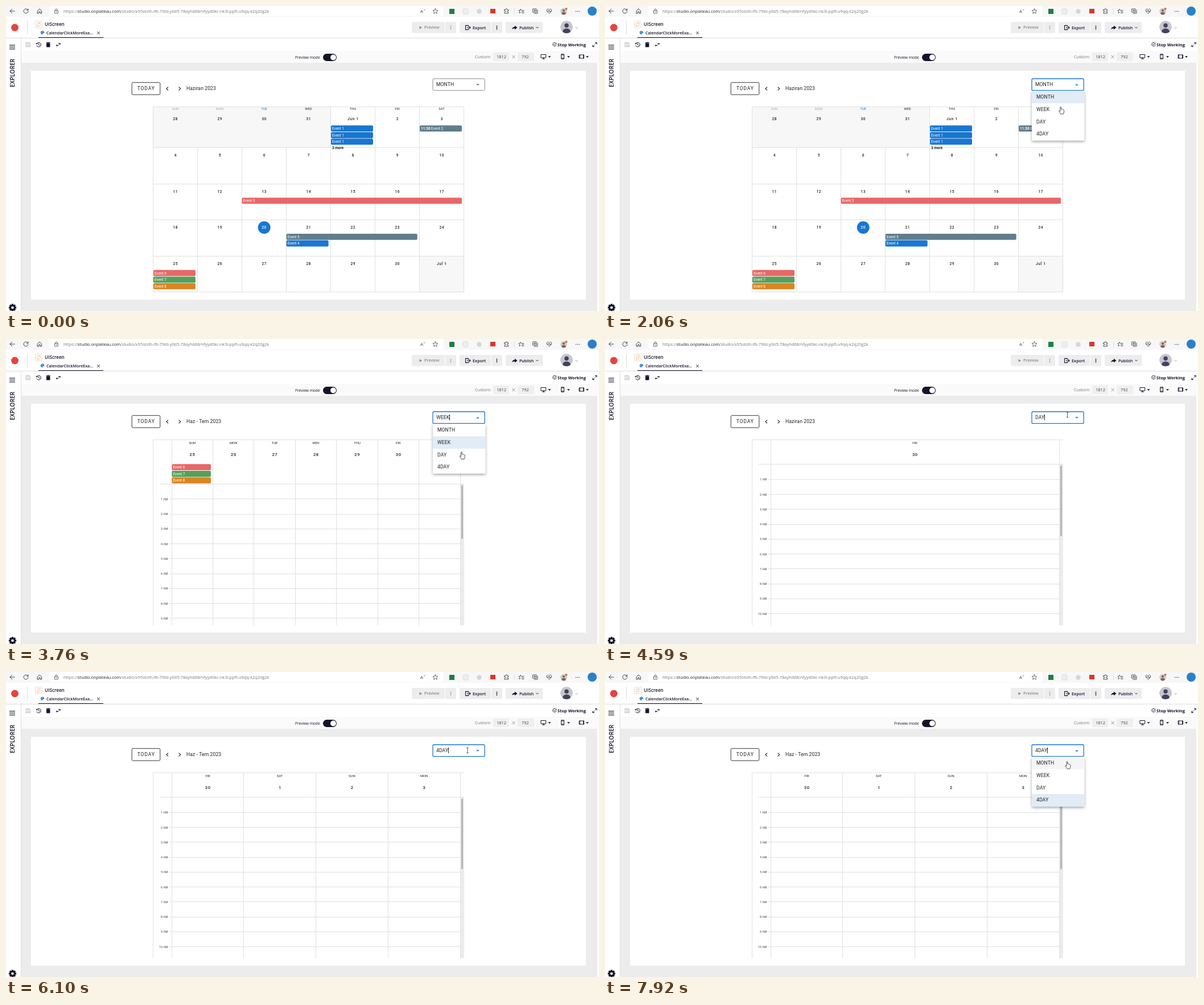
Write an HTML page with a canvas that moves like this. It is 1042x537 px and loops after 8 s.

```html
<!DOCTYPE html>
<html lang="en">
<head>
<meta charset="utf-8">
<title>Calendar view switcher</title>
<style>
html, body { margin: 0; width: 100%; height: 100%; overflow: hidden; background: #fff; }
canvas { display: block; }
</style>
</head>
<body>
<canvas id="stage" width="1042" height="537"></canvas>
<script>
const c = document.getElementById('stage').getContext('2d');
const LOOP = 8000;
const UI = '"Open Sans", "Noto Sans", sans-serif', CAL = 'Roboto, Arial, sans-serif';
const INK = '#14142b', BLUE = '#1976d2', LINE = '#e0e0e0', GREY = '#607d8b';
const RED = '#e86767', GREEN = '#55a059', ORANGE = '#dc8420';
const DAYS = ['SUN', 'MON', 'TUE', 'WED', 'THU', 'FRI', 'SAT'];
const MODES = ['MONTH', 'WEEK', 'DAY', '4DAY'];

function rect(x, y, w, h, fill, r = 0, stroke, lw = 1) {
  c.beginPath();
  c.roundRect(x, y, w, h, r);
  if (fill) { c.fillStyle = fill; c.fill(); }
  if (stroke) { c.strokeStyle = stroke; c.lineWidth = lw; c.stroke(); }
}
function disc(x, y, r, fill) {
  c.beginPath();
  c.arc(x, y, r, 0, 7);
  c.fillStyle = fill;
  c.fill();
}
function line(x1, y1, x2, y2, color = LINE, w = 1) {
  c.beginPath();
  c.moveTo(x1, y1);
  c.lineTo(x2, y2);
  c.strokeStyle = color;
  c.lineWidth = w;
  c.stroke();
}
const hLine = (x1, x2, y, color) => line(x1, Math.floor(y) + .5, x2, Math.floor(y) + .5, color);
const vLine = (x, y1, y2, color) => line(Math.floor(x) + .5, y1, Math.floor(x) + .5, y2, color);

// y is the middle of the capitals
function text(s, x, y, size, { color = '#222', font = CAL, weight = 400, align = 'left', gap = 0 } = {}) {
  c.font = `${weight} ${size}px ${font}`;
  c.textAlign = align;
  c.letterSpacing = gap + 'px';
  c.fillStyle = color;
  c.fillText(s, x, y + size * .357);
  return c.measureText(s).width;
}
const ui = (s, x, y, size, weight = 400, color = INK) => text(s, x, y, size, { font: UI, weight, color });
const body = (s, x, y) => text(s, x, y, 8.65, { gap: .08 });

// Path data relative to the centre of the icon
function icon(x, y, d, stroke = INK, fill, w = 1) {
  const p = new Path2D(d);
  c.save();
  c.translate(x, y);
  c.lineJoin = c.lineCap = 'round';
  if (fill) { c.fillStyle = fill; c.fill(p); }
  if (stroke) { c.strokeStyle = stroke; c.lineWidth = w; c.stroke(p); }
  c.restore();
}
const STAR = 'M0-4.5L1.3-1.5 4.5-1.2 2.1 1 2.8 4.2 0 2.5-2.8 4.2-2.1 1-4.5-1.2-1.3-1.5Z';
const SMALL_DOWN = 'M-2.5-1.2H2.5L0 1.4Z';
const CHEVRON = 'M-1.8-.9L0 .9 1.8-.9';
const CROSS = 'M-2.5-2.5L2.5 2.5M2.5-2.5L-2.5 2.5';

function person(x, y, r, back, front) {
  c.save();
  c.beginPath();
  c.arc(x, y, r, 0, 7);
  c.clip();
  disc(x, y, r, back);
  disc(x, y - r * .25, r * .34, front);
  c.beginPath();
  c.ellipse(x, y + r * .72, r * .62, r * .5, 0, 0, 7);
  c.fill();
  c.restore();
}

function browserBar() {
  rect(0, 0, 1042, 19, '#f7f7f7');
  rect(75, -1, 694, 19, '#fff', 5);
  const g = '#444';
  icon(11, 9, 'M4 0H-4M-.3-3.8L-4 0-.3 3.8', g);
  icon(35, 9, 'M3.6-1.8A4 4 0 1 0 4 .4M4-4V-1.6H1.5', g);
  icon(59, 9, 'M-3.6-.6L0-4 3.6-.6V4H1.2V1H-1.2V4H-3.6Z', g);
  icon(88.5, 9, 'M-2.8-1H2.8V3.8H-2.8ZM-1.6-1V-2.4A1.6 1.6 0 0 1 1.6-2.4V-1M0 1V1.6', g, null, .8);
  let x = 101;
  for (const [s, color] of [['https://', '#777'], ['studio.onplateau.com', '#222'],
    ['/studio/x95otzlh-lfli-79td-y0d5-78ayhd68/nfyyd0kc-nk3l-ppft-u9qq-k2q20g2k', '#777']])
    x += ui(s, x, 9, 7.37, 400, color);
  ui('A', 728, 9.5, 8, 400, g);
  ui('»', 734, 6.5, 5, 400, g);
  icon(754.5, 9, STAR, g, null, .8);
  rect(779, 5, 9, 9, '#1d7f46');
  rect(803, 5, 9, 9, '#f0eeec', 2, '#dedbd8');
  disc(831.5, 9.5, 4.2, '#d6d6d6');
  rect(851, 5, 9, 8, '#d9362c');
  icon(879.5, 9, 'M-3.5-2.5H-1.2A1.3 1.3 0 1 1 1.2-2.5H3.2V-.2A1.3 1.3 0 1 0 3.2 1.8V4H-3.5V1.8A1.3 1.3 0 1 0-3.5-.4Z', g, null, .9);
  vLine(893, 4, 15, '#ddd');
  icon(905, 9, 'M-1 2.2L-3 3.5-2.3 .8-4.2-1-1.8-1.3-.8-3.6 .3-1.3H5M1.5 1H5M1.5 3.2H5', g, null, .9);
  icon(930, 9, 'M-4-4H2V2H-4ZM-2 4H4V-2M-1-2.7V.7M-2.7-1H.7', g, null, .9);
  icon(954.5, 9, 'M0 4L-3.7 .2C-6-3-2-5.3 0-2.3 2-5.3 6-3 3.7 .2ZM-4 0H-1L0-1.5 1 1.5 2 0H4', g, null, .9);
  person(980, 9.5, 6, '#d8c7bd', '#75655f');
  disc(984.5, 5, 2, '#d96a45');
  for (const dx of [-3, 0, 3]) disc(1004.5 + dx, 9.5, .8, g);
  disc(1030, 9, 8, '#2a80c9');
}

function appHeader() {
  rect(0, 19, 1042, 38, '#fff');
  disc(15.5, 38, 6.5, '#e3453f');
  vLine(37, 26, 50, '#ddd');
  rect(51.5, 26.5, 12, 12, '#fffaf4', 2, '#eadfd4');
  icon(57.5, 32.5, 'M-3 .5A3 3 0 0 1 2.2-2M3-.5A3 3 0 0 1-2.2 2M2.4-3.6V-1.8H.6M-2.4 3.6V1.8H-.6', '#e9b98a', null, .7);
  ui('UIScreen', 68, 32.5, 8.1, 600);
  icon(64, 47, 'M0-3.2A3.3 3.1 0 1 0 .2 3C1 2.4-.2 1.4 .8 1H2.4C4.4-.8 2.6-3.2 0-3.2Z', null, '#2f7fc4');
  for (const [dx, dy] of [[-1.6, .2], [-.8, -1.5], [1, -1.5]]) disc(64 + dx, 47 + dy, .55, '#fff');
  ui('CalendarClickMoreExa...', 71, 47, 7.05, 600);
  icon(162.5, 47.5, 'M-2-2L2 2M2-2L-2 2', INK);
  rect(57, 55, 114, 1.3, INK);
  hLine(0, 1042, 56, '#dcdcdc');

  for (const [x, w] of [[713, 58], [772, 19], [797, 55], [853, 19], [878, 65.5]]) rect(x, 28, w, 19.5, '#ededee', 1.5);
  icon(728.5, 38, 'M-2-2.6L2.6 0-2 2.6Z', null, '#8a8a90');
  ui('Preview', 735, 38, 7, 600, '#8a8a90');
  ui('Export', 820, 38, 7.35, 600);
  ui('Publish', 902, 38.2, 7.1, 600);
  for (const dy of [-2.5, 0, 2.5]) {
    disc(781.5, 38 + dy, .8, '#77777d');
    disc(862.5, 38 + dy, .9, INK);
  }
  icon(811.5, 38, 'M1-2V-3.6H-4V3.6H1V2M-1 0H4.5M2.8-1.8L4.5 0 2.8 1.8', INK, null, 1.1);
  icon(893.5, 38, 'M.5-3.6L5 0 .5 3.6V1.5C-2 1.3-3.6 2-4.6 3.4-4 .6-2.4-1.2 .5-1.5Z', null, INK);
  icon(933.5, 38, CHEVRON, INK);
  person(985, 37, 11, '#c6c6cf', '#43435c');
  icon(1002.5, 38.5, CHEVRON, '#888', null, .8);
}

function toolbars() {
  icon(39, 68, 'M-3.7-3.7H2.5L3.7-2.5V3.7H-3.7ZM-2-3.5V-1H1.5V-3.5M-2 3.5V1H2V3.5', '#b9b9bd', null, .9);
  icon(57.5, 68, 'M-3.6-1.6A3.9 3.9 0 1 1-3.6 1.8M-4.6-2.6L-3.7-.9-1.8-1.6M0-2V.3L1.7 1.2', INK);
  icon(74.3, 68, 'M-2.7-2.2H2.7V4H-2.7ZM-3.2-3.4H3.2M-1-4H1', INK, INK, .9);
  icon(92, 68, 'M0-1.4H3.6M2.4-2.6L3.8-1.4 2.4-.2M0 1.5H-3.6M-2.4 .3L-3.8 1.5-2.4 2.7', INK);
  icon(964, 67.5, 'M2.6-1.8A3.2 3.2 0 1 0 3.1 .6M-1.4-.3L0 1.1 3.5-2.6', INK, null, .9);
  ui('Stop Working', 969, 68, 7.5, 700);
  icon(1034.5, 68, 'M.8-.8L3.4-3.4M1-3.6H3.6V-1M-.8 .8L-3.4 3.4M-1 3.6H-3.6V1', INK);

  rect(27, 79, 1015, 21, '#fafafa');
  ui('Preview mode', 508, 90.5, 6.65);
  rect(557, 84, 24, 13, INK, 6.5);
  disc(575, 90.5, 5, '#fff');
  ui('Custom:', 824, 89.5, 7.4, 400, '#777');
  rect(856, 82, 28, 15, '#efefef', 1);
  rect(899, 82, 29, 15, '#efefef', 1);
  ui('1812', 862, 89.5, 7.4, 400, '#444');
  ui('792', 906, 89.5, 7.4, 400, '#444');
  icon(892, 89.5, CROSS, '#888', null, .9);
  icon(944.5, 89, 'M-4.2-3.5H4.2V2H-4.2ZM0 2V4M-2 4H2', INK);
  icon(978.3, 89, 'M-2.2-4.2H2.2V4.2H-2.2ZM-2-3H2M-2 3H2', INK);
  icon(1011.5, 89, 'M-4-3H4V3H-4ZM-3.2-3V3M3.2-3V3', INK);
  for (const x of [955, 988.5, 1021.5]) icon(x, 89.5, SMALL_DOWN, null, INK);
}

function sidebar() {
  vLine(26, 57, 537, LINE);
  for (const y of [69, 72.3, 75.6]) line(6, y, 16, y, INK, 1.2);
  c.save();
  c.translate(11.5, 143);
  c.rotate(-Math.PI / 2);
  ui('EXPLORER', 0, 0, 10.2, 600);
  c.restore();
  for (let i = 0; i < 4; i++) {
    const a = i * Math.PI / 4, dx = 6.6 * Math.cos(a), dy = 6.6 * Math.sin(a);
    line(11.5 - dx, 531 - dy, 11.5 + dx, 531 + dy, INK, 3.2);
  }
  disc(11.5, 531, 5.2, INK);
  disc(11.5, 531, 2.3, '#fff');
}

function event(label, x, y, w, color, time = '') {
  rect(x, y, w, 10.8, color, 2);
  const used = time ? text(time, x + 2, y + 5.4, 6.45, { color: '#fff', weight: 700 }) + 1.5 : 0;
  text(label, x + 2 + used, y + 5.4, 6.45, { color: '#fff' });
}
function stack(events, x, y, w) {
  events.forEach(([n, color], i) => event('Event ' + n, x, y + i * 11.6, w, color));
}
const LAST_EVENTS = [[6, RED], [7, GREEN], [8, ORANGE]];

function monthView() {
  const colX = i => 258.5 + 78 * i, rowY = i => 185.9 + 63.6 * i;
  rect(258, 177, 312.5, 72.5, '#f7f7f7');
  rect(727, 440.5, 77.5, 63, '#f7f7f7');
  hLine(258, 805, 177);
  for (let i = 1; i < 6; i++) hLine(258, 805, rowY(i));
  for (let i = 0; i < 8; i++) vLine(colX(i), i > 0 && i < 4 ? 249 : 177, 504);
  DAYS.forEach((d, i) => text(d, colX(i) + 39, 181, 5.9,
    { align: 'center', color: i < 2 ? '#aaa' : i === 2 ? BLUE : '#222' }));
  disc(453.7, 390, 11, BLUE);
  for (let i = 0; i < 35; i++) {
    const n = i < 4 ? 28 + i : i - 3;
    const label = n === 1 && i > 3 ? 'Jun 1' : i === 34 ? 'Jul 1' : n;
    text(String(label), colX(i % 7) + 39.3, 199 + 63.6 * Math.floor(i / 7), 6.6,
      { align: 'center', weight: 500, gap: .6, color: i === 23 ? '#fff' : '#222' });
  }
  stack([[1, BLUE], [1, BLUE], [1, BLUE]], 571, 210.3, 74);
  text('3 more', 573, 249.7, 6.45, { weight: 700 });
  event('Event 2', 727, 210.3, 74, GREY, '11:30');
  event('Event 3', 414.5, 337.5, 386.5, RED);
  event('Event 5', 492.7, 401, 230, GREY);
  event('Event 4', 492.7, 412.6, 74, BLUE);
  stack(LAST_EVENTS, 259, 464.8, 74);
}

function hoursView(days, top, thumbEnd) {
  const w = 507 / days.length;
  rect(798.5, top, 6.5, 504 - top, '#ececec');
  rect(800, top + 2.5, 3, thumbEnd - top - 2.5, '#b4b4b4', 1);
  hLine(258, 805, 177);
  hLine(270, 805, top);
  vLine(258, 177, 504);
  for (let i = 0; i <= days.length; i++) vLine(291 + w * i, 177, 504);
  days.forEach(([name, n], i) => {
    const x = 291 + w * (i + .5);
    text(name, x, 182.7, 5.9, { align: 'center' });
    text(String(n), x + .3, 203, 7.6, { align: 'center', weight: 500, gap: .6 });
  });
  for (let h = 1; top + 26.25 * h < 500; h++) {
    const y = top + .5 + 26.25 * h;
    hLine(287, 798, y);
    text(h + ' AM', 284.5, y + .3, 5.4, { align: 'right', color: '#444' });
  }
}

const VIEWS = [
  monthView,
  () => {
    hoursView(DAYS.map((d, i) => [d, i < 6 ? 25 + i : 1]), 255, 352);
    stack(LAST_EVENTS, 291.5, 220.3, 68.5);
  },
  () => hoursView([['FRI', 30]], 220.5, 347),
  () => hoursView([['FRI', 30], ['SAT', 1], ['SUN', 2], ['MON', 3]], 220.5, 347)
];

// Each round: press the field, then pick the next view from the menu
const PRESSES = [1420, 3080, 4750, 6460], PICKS = [2480, 4230, 5800];
const FOCUS = PRESSES[0] + 60;
const within = (t, pressLag, pickLag) =>
  PRESSES.some((p, i) => t >= p + pressLag && t < (PICKS[i] ?? LOOP) + pickLag);

// Pointer stops: time, x, y
const STOPS = [
  [190, 1025, 528], [1380, 813, 137], [1600, 812.5, 138], [2200, 800, 180], [2480, 799, 182],
  [2700, 812, 133], [3080, 812, 138], [3300, 812, 139], [3860, 800, 201], [4230, 801, 203],
  [4500, 812.5, 133], [4850, 812.5, 134], [5550, 802, 223], [5800, 802, 225],
  [6080, 811, 138], [6560, 811, 137.5], [6680, 811, 137.5], [7190, 812, 158]
];

function pointerAt(t) {
  const i = STOPS.findIndex(s => s[0] > t);
  if (i < 0) return STOPS.at(-1).slice(1);
  if (i === 0) return STOPS[0].slice(1);
  const [t0, x0, y0] = STOPS[i - 1], [t1, x1, y1] = STOPS[i];
  const k = 1 - (1 - (t - t0) / (t1 - t0)) ** 2;
  return [x0 + (x1 - x0) * k, y0 + (y1 - y0) * k];
}
const inField = (x, y) => x > 749 && x < 842 && y > 127 && y < 149;

function selectBox(t, mode) {
  const focused = t >= FOCUS, hover = inField(...pointerAt(t)), arrowUp = within(t, 60, 110);
  rect(750, 128, 91.2, 20.7, '#fff', 2, focused ? BLUE : hover ? '#333' : '#8a8a8a', focused ? 1.3 : 1);
  const w = body(MODES[mode], 756, 138.2);
  icon(829, 138.5, arrowUp ? 'M-2.7 1.3H2.7L0-1.4Z' : 'M-2.7-1.3H2.7L0 1.4Z', null, focused ? BLUE : '#666');
  const start = [FOCUS, ...PICKS].findLast(s => s <= t);
  if (focused && (t - start) % 1060 < 530) rect(Math.round(756 + w), 133, 1, 10, '#222');
}

function menu(t, mode) {
  c.save();
  c.shadowColor = 'rgba(0,0,0,.35)';
  c.shadowBlur = 5;
  c.shadowOffsetY = 2;
  rect(750, 149.5, 92.5, 87.5, '#fff', 1);
  c.restore();
  const [x, y] = pointerAt(t - 150);
  const hover = x > 750 && y > 149 ? Math.floor((y - 149) / 21.9) : -1;
  MODES.forEach((m, i) => {
    const fill = i === mode ? '#e1ecf7' : i === hover ? '#f5f5f5' : null;
    if (fill) rect(750, 149.4 + 21.9 * i, 92.5, 21.9, fill);
    body(m, 758, 160 + 21.8 * i);
  });
}

function pointer(t, menuShown) {
  if (t < 190) return;
  const [x, y] = pointerAt(t);
  if ([...PRESSES, ...PICKS].some(k => t > k - 100 && t < k + 50)) disc(x, y, 5.5, '#f6ee3c');
  if (inField(x, y))
    icon(x, y, 'M-1.3-4.4H1.3M0-4.4V4.4M-1.3 4.4H1.3', '#333', null, .8);
  else if (menuShown && x > 750 && x < 843 && y >= 149 && y < 237)
    icon(x, y, 'M-1 .5C-1-.7 .9-.7 .9 .5V4C1.5 3.4 2.5 3.6 2.7 4.4 3.4 3.9 4.3 4.3 4.4 5 5.2 4.6 5.9 5.1 5.9 6V8.6C5.9 10.2 5 10.8 4.8 12.4H0C-.4 10.8-2.6 9.2-3 7.6-3.2 6.4-2 6.2-1 7.4Z', '#222', '#fff', .8);
  else
    icon(x, y, 'M0 0V9.3L2.1 7.4 3.6 10.8 5 10.2 3.5 6.9H6.4Z', '#222', '#fff', .8);
}

function draw(t) {
  const mode = PICKS.filter(p => t >= p).length;
  const menuShown = within(t, 230, 0);
  rect(0, 0, 1042, 537, '#fff');
  rect(27, 100, 1012, 437, '#ececec');
  rect(44, 114, 975, 403, '#fff');
  browserBar();
  appHeader();
  toolbars();
  sidebar();
  rect(221.2, 134.7, 49.6, 21.4, '#fff', 2, '#333');
  text('TODAY', 230.8, 145.3, 8.6, { gap: .8 });
  icon(283.3, 145.5, 'M1.4-2.7L-1.4 0 1.4 2.7', '#222', null, 1.1);
  icon(305.3, 145.5, 'M-1.4-2.7L1.4 0-1.4 2.7', '#222', null, 1.1);
  body(mode % 2 ? 'Haz - Tem 2023' : 'Haziran 2023', 317, 145.3);
  VIEWS[mode]();
  selectBox(t, mode);
  if (menuShown) menu(t, mode);
  pointer(t, menuShown);
}

const begin = performance.now();
function frame() {
  draw((performance.now() - begin) % LOOP);
  requestAnimationFrame(frame);
}
frame();
</script>
</body>
</html>
```
